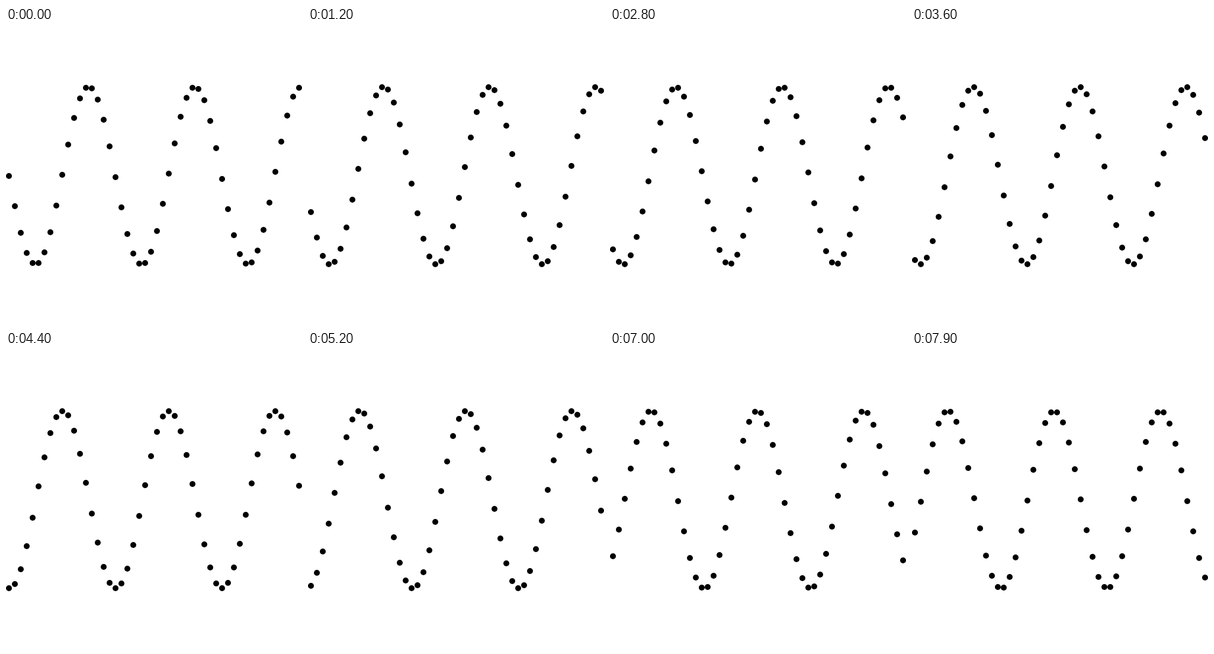
Write an HTML page with a canvas that moves like this. It is 500 by 500 pixels and loops after 8000 ms.

```html
<!DOCTYPE html>
<html lang="en">
<head>
<meta charset="utf-8">
<title>Sine wave of dots</title>
<style>
  html, body { margin: 0; width: 100%; height: 100%; overflow: hidden; background: #fff; }
  canvas { display: block; width: 500px; height: 500px; }
</style>
</head>
<body>
<canvas id="stage" width="500" height="500"></canvas>
<script>
const ctx = document.getElementById('stage').getContext('2d');
const SIZE = 500, GAP = 10, RADIUS = 5, AMPLITUDE = 150;
const LOOP = 8000, STEP = 100;
const DOT_PHASE = 0.35, STEP_PHASE = 0.035;

function draw(step) {
  ctx.fillStyle = '#fff';
  ctx.fillRect(0, 0, SIZE, SIZE);
  ctx.fillStyle = '#000';
  for (let i = 0; i < SIZE / GAP; i++) {
    const angle = i * DOT_PHASE + step * STEP_PHASE;
    const x = i * GAP + RADIUS;
    const y = Math.floor(SIZE / 2 + AMPLITUDE * Math.sin(angle));
    ctx.beginPath();
    ctx.arc(x, y, RADIUS, 0, Math.PI * 2);
    ctx.fill();
  }
}

let start = null;
function tick(now) {
  if (start === null) start = now;
  draw(Math.floor(((now - start) % LOOP) / STEP));
  requestAnimationFrame(tick);
}

draw(0);
requestAnimationFrame(tick);
</script>
</body>
</html>
```
